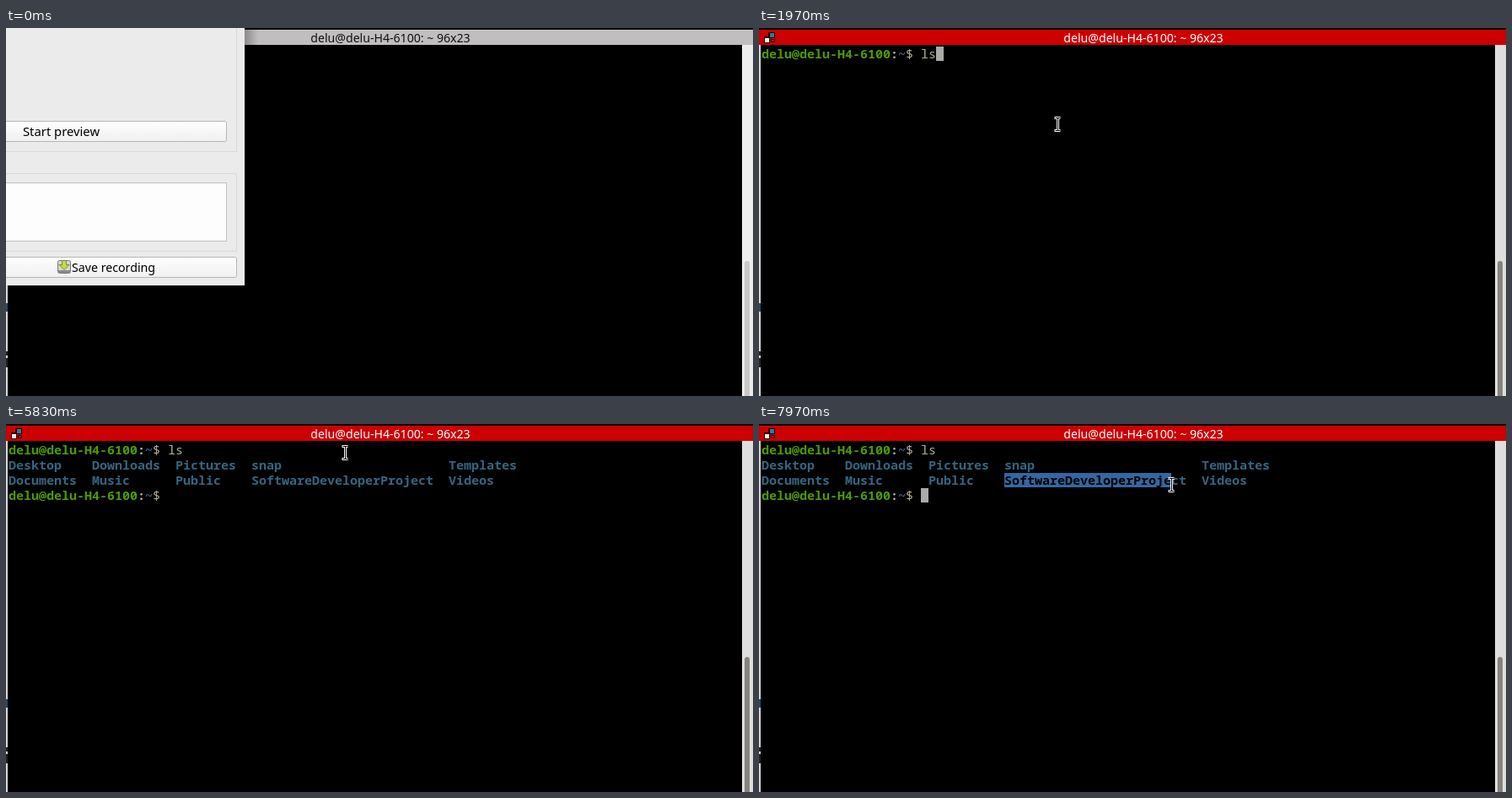
Animation, 886 px wide and 436 px high, one loop 8 s. Source, as an HTML page:

```html
<!DOCTYPE html>
<html lang="en">
<head>
<meta charset="utf-8">
<title>Terminal session</title>
<style>
  html, body { margin: 0; width: 100%; height: 100%; overflow: hidden; background: #000; }
  svg { display: block; width: 886px; height: 436px; }
  .ui { font-family: "Noto Sans", "Open Sans", sans-serif; font-size: 14.1px; }
  .term { font: 15px "Noto Sans Mono", "DejaVu Sans Mono", monospace; fill: #b4b19c; white-space: pre; }
  .bold { font-weight: bold; }
  .user { fill: #4e9a06; font-weight: bold; }
  .path { fill: #3c6694; font-weight: bold; }
  .dir { fill: #356680; font-weight: bold; }
  .line { fill: none; stroke: #d8d8d8; }
  .button { fill: url(#shine); stroke: #b6b6b4; }
  .part { fill: #f2f2f2; stroke: #c4c4c4; }
</style>
</head>
<body>
<svg viewBox="0 0 886 436">
  <defs>
    <linearGradient id="shine" x2="0" y2="1">
      <stop offset="0" stop-color="#fefefe"/>
      <stop offset="1" stop-color="#f0f0f0"/>
    </linearGradient>
    <linearGradient id="shade">
      <stop offset="0" stop-color="#8c8a8a"/>
      <stop offset="1" stop-color="#c0bebe"/>
    </linearGradient>
  </defs>

  <rect width="886" height="436"/>
  <rect y="20" width="2" height="416" fill="#d6d6d6"/>
  <path d="M0 326h2v10h-2z" fill="#234a68"/>
  <path d="M0 383h2v5h-2zM0 391h2v11h-2z" fill="#222"/>
  <rect id="strip" x="873" y="20" width="13" height="416"/>
  <rect id="thumb" x="876" y="276" width="6" height="164" rx="3"/>
  <rect id="bar" y="2" width="886" height="18"/>
  <text id="title" class="ui" x="456" y="17" text-anchor="middle">delu@delu-H4-6100: ~ 96x23</text>

  <g id="shell">
    <path d="M11 5h8v7h-8zM6 10h7v8h-7zM14 13h5v4h-5z" fill="#200"/>
    <path d="M13 6h5v5h-5z" fill="#2a7ea0"/>
    <path d="M7 12h5v5h-5z" fill="#f0f0f0"/>
    <path d="M15 14h3v2h-3z" fill="#b00"/>
    <g class="term">
      <g id="prompt">
        <text class="user" x="3" y="36">delu@delu-H4-6100</text>
        <text class="bold" x="156" y="36">:</text>
        <text class="path" x="165" y="36">~</text>
        <text x="174" y="36">$</text>
      </g>
      <text x="192" y="36">ls</text>
      <g id="output">
        <g id="dirs" class="dir"></g>
        <use href="#prompt" y="54"/>
        <rect id="mark" x="291" y="58" height="17" fill="#3467a2"/>
        <text id="marked" class="bold" x="291" y="72" style="fill:#000"></text>
      </g>
    </g>
    <rect id="caret" width="9" height="17" fill="#aaaaa6"/>
  </g>

  <g id="recorder">
    <rect x="283" y="2" width="16" height="18" fill="url(#shade)"/>
    <rect width="283" height="305" fill="#ebebeb"/>
    <path class="line" d="M0 146.5H273.5V0M0 172.5H273.5V264.5H0"/>
    <rect class="button" x="-5.5" y="110.5" width="267" height="24" rx="2"/>
    <text class="ui" x="20" y="128" style="font-size:14.8px">Start preview</text>
    <rect x="-5.5" y="183.5" width="267" height="69" fill="#fdfdfd" stroke="#c0c0be"/>
    <g id="scroller">
      <rect x="247.5" y="183.5" width="14" height="69" fill="#f8f8f8" stroke="#c4c4c4"/>
      <path class="part" d="M247.5 183.5h14v14h-14zM247.5 238.5h14v14h-14z"/>
      <rect class="part" x="247.5" y="197.5" width="14" height="14" style="fill:#e4e4e4"/>
      <path d="M250 192.5l4.5-4 4.5 4zM250 243.5l4.5 4 4.5-4z" fill="#555"/>
    </g>
    <rect class="button" x="-5.5" y="271.5" width="279" height="24" rx="2"/>
    <rect x="61.5" y="275.5" width="15" height="15" rx="2" fill="#d6d6d2" stroke="#777"/>
    <path d="M62 287h14v3h-14z" fill="#8a8a88"/>
    <path d="M66.5 275.5h5v5h3.5l-6 6-6-6h3.5z" fill="#c6d848" stroke="#7e8a2c"/>
    <text class="ui" x="78" y="289" style="font-size:14.2px">Save recording</text>
  </g>

  <g id="mouse">
    <g id="beam" fill="none">
      <path d="M-3.5 -7.5H3.5M-3.5 7.5H3.5M.5 -7.5V7.5" stroke="#fff" stroke-width="3"/>
      <path d="M-2.5 -7.5H3.5M-2.5 7.5H3.5M.5 -7.5V7.5" stroke="#000"/>
    </g>
    <path id="arrow" d="M0 0V15L3.5 12 6 17.5 8.5 16.5 6 11H11Z" stroke="#fff"/>
  </g>
</svg>
<script>
const LOOP = 8000, RAISE = 1830, ENTER = 3930, BLINK = 600;
const FOLDER = "SoftwareDeveloperProject";
const el = id => document.getElementById(id);
const show = (id, on) => el(id).setAttribute("display", on ? "inline" : "none");
const fill = (id, color) => el(id).setAttribute("fill", color);

const columns = [
  [3, "Desktop", "Documents"], [102, "Downloads", "Music"], [201, "Pictures", "Public"],
  [291, "snap", FOLDER], [525, "Templates", "Videos"]
];
el("dirs").innerHTML = columns.map(([x, a, b]) =>
  `<text x="${x}" y="54">${a}</text><text x="${x}" y="72">${b}</text>`).join("");

// time, x, y
const path = [
  [0, -20, 250], [30, -20, 250], [800, 150, 215], [970, 150, 215], [1530, 354, 114],
  [2000, 354, 114], [2530, 900, 330], [4260, 900, 330], [4700, 556, 85], [5470, 474, 24],
  [5600, 474, 24], [5830, 402, 34], [6400, 345, 62], [6730, 289, 70], [6880, 289, 70],
  [7670, 473, 72], [7970, 489, 72], [LOOP, 489, 72]
];

function mouseAt(t) {
  const i = path.findIndex(p => p[0] > t);
  const [t0, x0, y0] = path[i - 1], [t1, x1, y1] = path[i];
  const k = (t - t0) / (t1 - t0);
  return [Math.round(x0 + (x1 - x0) * k), Math.round(y0 + (y1 - y0) * k)];
}

function draw(t) {
  const focused = t >= RAISE, entered = t >= ENTER;
  show("recorder", !focused);
  show("shell", focused);
  show("scroller", t >= 100);
  show("output", entered);
  fill("bar", focused ? "#cc0000" : "#c0bebe");
  fill("title", focused ? "#fff" : "#111");
  fill("strip", focused ? "#dedede" : "#ededed");
  fill("thumb", focused ? "#85837c" : "#c8c8c6");

  const caret = el("caret");
  caret.setAttribute("x", entered ? 192 : 210);
  caret.setAttribute("y", entered ? 76 : 22);
  show("caret", Math.floor((t - (entered ? ENTER : RAISE)) / BLINK) % 2 === 0);

  const [x, y] = mouseAt(t);
  const overRecorder = !focused && x < 283;
  el("mouse").setAttribute("transform", `translate(${x} ${y})`);
  show("arrow", overRecorder);
  show("beam", !overRecorder);

  const count = t < 6880 ? 0 : Math.max(0, Math.round((x - 291) / 9));
  el("mark").setAttribute("width", count * 9);
  el("marked").textContent = FOLDER.slice(0, count);
}

function tick() {
  draw(performance.now() % LOOP);
  requestAnimationFrame(tick);
}
tick();
</script>
</body>
</html>
```
